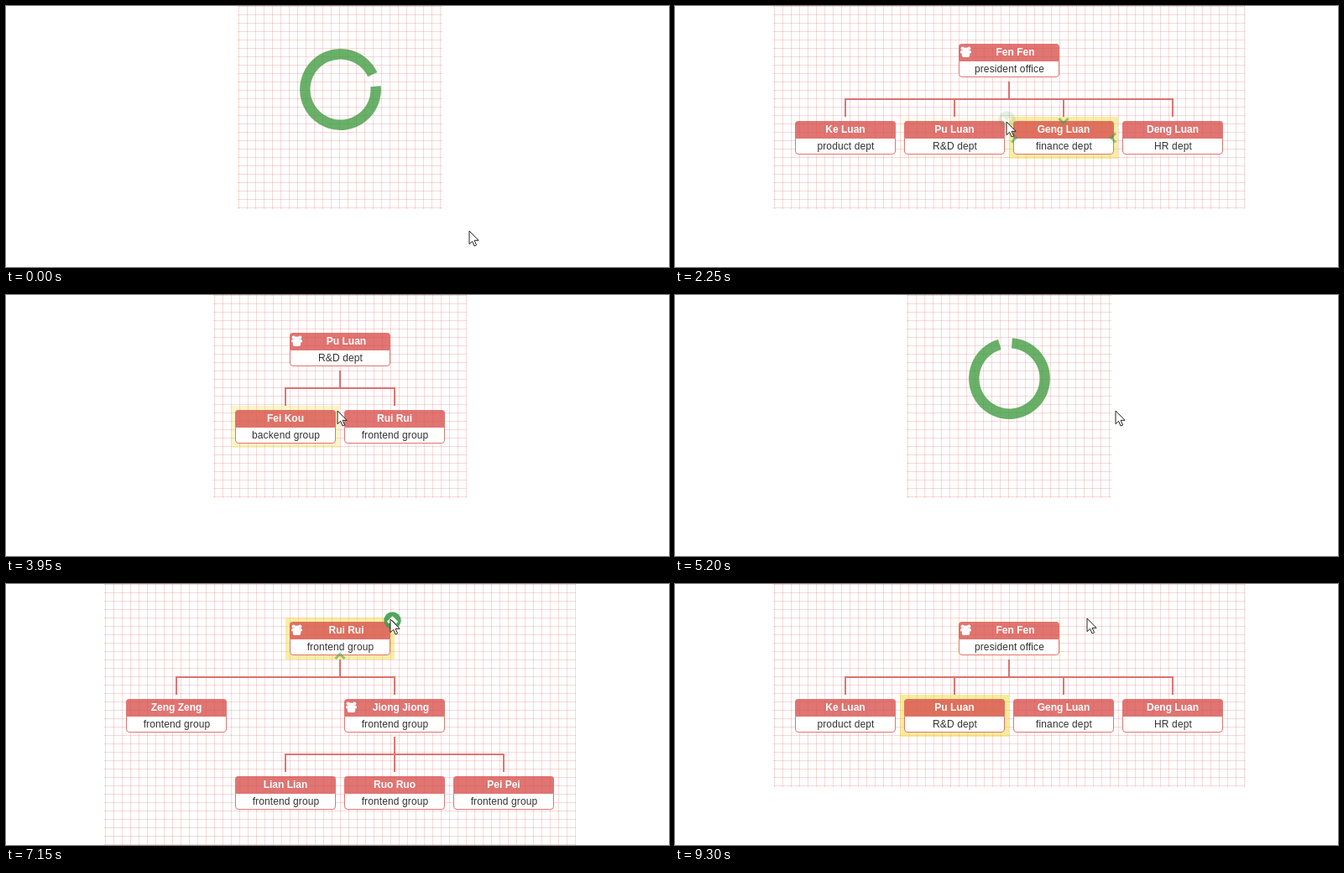
An HTML page for the animation above (9700 ms loop, 790x311 px).

```html
<!DOCTYPE html>
<html lang="en">
<head>
<meta charset="utf-8">
<title>Org chart drill down</title>
<style>
html, body { margin: 0; width: 100%; height: 100%; overflow: hidden; background: #fff; }
svg { display: block; width: 790px; height: 311px; }
text { font: 12px "Liberation Sans", Arial, sans-serif; text-anchor: middle; }
.name { font-weight: bold; fill: #fff; }
.dept { fill: #333; letter-spacing: .12px; }
.red { fill: rgba(217, 83, 79, .8); }
.grid { fill: rgba(200, 0, 0, .15); shape-rendering: crispEdges; }
.glow { fill: rgba(238, 217, 54, .5); }
.edge { fill: none; stroke: rgba(68, 157, 68, .55); stroke-width: 3; }
</style>
</head>
<body>
<svg id="stage" viewBox="0 0 790 311"></svg>
<script>
const LOOP = 9700, STEP = 50;
const stage = document.getElementById('stage');

function el(parent, tag, attrs, text) {
  const e = document.createElementNS('http://www.w3.org/2000/svg', tag);
  for (const k in attrs) e.setAttribute(k, attrs[k]);
  if (text) e.textContent = text;
  parent.appendChild(e);
  return e;
}

// 10px squared paper, lines one pixel wide
function grid(parent, x, w, h) {
  let cols = '', rows = '';
  for (let i = x + 1; i < x + w; i += 10) cols += `M${i} 0h1v${h}h-1z`;
  for (let j = 0; j < h; j += 10) rows += `M${x} ${j}h${w}v1h${-w}z`;
  el(parent, 'path', { class: 'grid', d: cols });
  el(parent, 'path', { class: 'grid', d: rows });
}

// connector from a parent cell to its children
function tree(parent, from, top, kids) {
  const a = kids[0], b = kids[kids.length - 1];
  let d = `M${from - 1} ${top}h2v20h-2zM${a - 1} ${top + 20}H${b + 1}v2H${a - 1}z`;
  for (const k of kids) d += `M${k - 1} ${top + 22}h2v20h-2z`;
  el(parent, 'path', { class: 'red', d });
}

function leaderIcon(parent, x, y) {
  const g = el(parent, 'g', { fill: '#fff', transform: `translate(${x} ${y})` });
  el(g, 'circle', { cx: 2.8, cy: 2.6, r: 2.2 });
  el(g, 'circle', { cx: 10.2, cy: 2.6, r: 2.2 });
  el(g, 'circle', { cx: 6.5, cy: 4.4, r: 2.9 });
  el(g, 'rect', { x: 0, y: 5, width: 13, height: 3.6, rx: 1.6 });
  el(g, 'rect', { x: 1.8, y: 7, width: 9.4, height: 6, rx: 2 });
}

// edges: t, b, l, r arrows shown on hover; drill: 1 down, -1 up
function node(layers, { x, y, name, dept, lead, edges = '', drill }) {
  const g = el(layers.base, 'g', { transform: `translate(${x - 65} ${y})` });
  const top = el(layers.over, 'g', { transform: `translate(${x - 65} ${y})` });
  const glow = el(g, 'rect', { class: 'glow', width: 130, height: 50 });
  el(g, 'path', { class: 'red', d: 'M5 25V9a4 4 0 0 1 4-4H121a4 4 0 0 1 4 4V25z' });
  el(g, 'path', { d: 'M5 25H125V41a4 4 0 0 1-4 4H9a4 4 0 0 1-4-4z', fill: '#fff' });
  el(g, 'path', {
    d: 'M5.5 25.5H124.5V41a3.5 3.5 0 0 1-3.5 3.5H9a3.5 3.5 0 0 1-3.5-3.5z',
    fill: 'none', stroke: 'rgba(217,83,79,.8)'
  });
  if (lead) leaderIcon(g, 7, 8);
  el(g, 'text', { class: 'name', x: lead ? 72.5 : 65, y: 19 }, name);
  el(g, 'text', { class: 'dept', x: 65.5, y: 39 }, dept);

  const arrows = el(top, 'g', { class: 'edge' });
  const shapes = {
    t: 'M59.5 2l5.5 5.5 5.5-5.5', b: 'M59.5 49l5.5-5.5 5.5 5.5',
    l: 'M3 19.5l5.5 5.5-5.5 5.5', r: 'M127 19.5l-5.5 5.5 5.5 5.5'
  };
  for (const e of edges) el(arrows, 'path', { d: shapes[e] });
  const icon = el(top, 'g', {});
  if (drill) {
    el(icon, 'circle', { cx: 127.5, cy: 3.5, r: 10.2, fill: '#3d9d4c' });
    el(icon, 'path', {
      d: `M122 ${3.5 - 2.5 * drill}l5.5 ${5.5 * drill} 5.5 ${-5.5 * drill}`,
      fill: 'none', stroke: '#fff', 'stroke-width': 3.2
    });
  }
  return { glow, arrows, icon };
}

function chart(x, w, h, links, list) {
  const root = el(stage, 'g', {});
  grid(root, x, w, h);
  const layers = { base: el(root, 'g', {}), over: el(root, 'g', {}) };
  for (const l of links) tree(layers.base, ...l);
  return { root, nodes: list.map(n => node(layers, n)) };
}

const COL = [203, 333, 463, 593], MID = 398, ROW = [40, 132, 224];
const front = 'frontend group';

const charts = {
  wait: chart(276, 244, 242, [], []),
  office: chart(117, 562, 242, [[MID, 90, COL]], [
    { x: MID, y: ROW[0], name: 'Fen Fen', dept: 'president office', lead: 1, edges: 'b' },
    { x: COL[0], y: ROW[1], name: 'Ke Luan', dept: 'product dept' },
    { x: COL[1], y: ROW[1], name: 'Pu Luan', dept: 'R&D dept', edges: 'tlr', drill: 1 },
    { x: COL[2], y: ROW[1], name: 'Geng Luan', dept: 'finance dept', edges: 'tlr' },
    { x: COL[3], y: ROW[1], name: 'Deng Luan', dept: 'HR dept' }
  ]),
  lab: chart(247, 302, 242, [[MID, 90, [COL[1], COL[2]]]], [
    { x: MID, y: ROW[0], name: 'Pu Luan', dept: 'R&D dept', lead: 1, edges: 'b', drill: -1 },
    { x: COL[1], y: ROW[1], name: 'Fei Kou', dept: 'backend group', edges: 'tlr' },
    { x: COL[2], y: ROW[1], name: 'Rui Rui', dept: front, edges: 'tlr', drill: 1 }
  ]),
  team: chart(117, 562, 311, [[MID, 90, [COL[0], COL[2]]], [COL[2], 182, COL.slice(1)]], [
    { x: MID, y: ROW[0], name: 'Rui Rui', dept: front, lead: 1, edges: 'b', drill: -1 },
    { x: COL[0], y: ROW[1], name: 'Zeng Zeng', dept: front },
    { x: COL[2], y: ROW[1], name: 'Jiong Jiong', dept: front, lead: 1, edges: 'tblr' },
    { x: COL[1], y: ROW[2], name: 'Lian Lian', dept: front },
    { x: COL[2], y: ROW[2], name: 'Ruo Ruo', dept: front },
    { x: COL[3], y: ROW[2], name: 'Pei Pei', dept: front }
  ])
};

// ring with a 20 degree gap centred on angle 0
const R = 42.2, gx = R * Math.cos(Math.PI / 18), gy = R * Math.sin(Math.PI / 18);
const ring = el(charts.wait.root, 'path', {
  d: `M${gx} ${gy}A${R} ${R} 0 1 1 ${gx} ${-gy}`,
  fill: 'none', stroke: 'rgba(68,157,68,.8)', 'stroke-width': 12.4
});

const pointer = el(stage, 'path', {
  d: 'M.5.5V16.2L4.1 12.8 6.6 18.5 9.1 17.4 6.6 11.8H11.6z',
  fill: '#fff', stroke: '#222', 'stroke-width': 1
});

// start, chart, start of its spin
const scenes = [
  [0, 'wait', -450], [550, 'office'], [2900, 'wait', 2900], [3850, 'lab'],
  [5200, 'wait', 5200], [6100, 'team'], [7600, 'lab'], [8500, 'office']
];

// chart, node, enter, leave
const hovers = [
  ['office', 3, 1600, 2220], ['office', 2, 2220, 2900],
  ['lab', 1, 3820, 4080], ['lab', 2, 4080, 5200],
  ['team', 2, 6480, 6540], ['team', 0, 6880, 7600],
  ['lab', 0, 7570, 8500], ['office', 0, 8470, 9000]
];

// chart, node, start of lasting highlight
const focus = [['lab', 2, 7600], ['office', 2, 8500]];

// time, x, y, eased
const path = [
  [1260, 552, 268], [1500, 512, 200], [1700, 474, 168], [2250, 395, 138],
  [4000, 395, 138], [4700, 525, 138, 1], [6450, 525, 138],
  [6930, 458, 42, 1], [8960, 458, 42], [9260, 491, 41, 1]
];

const clamp = v => Math.max(0, Math.min(1, v));
const smooth = v => v * v * (3 - 2 * v);
const fadeIn = v => 1 - (1 - clamp(v)) ** 2;

function pointerAt(t) {
  let a = path[0];
  for (const b of path) {
    if (t < b[0]) {
      let k = clamp((t - a[0]) / (b[0] - a[0] || 1));
      if (b[3]) k = smooth(k);
      return [a[1] + (b[1] - a[1]) * k, a[2] + (b[2] - a[2]) * k];
    }
    a = b;
  }
  return [a[1], a[2]];
}

function hoverAt(name, i, t) {
  let v = 0;
  for (const [c, n, on, off] of hovers) {
    if (c !== name || n !== i || t < on) continue;
    const peak = fadeIn((Math.min(t, off) - on) / 400);
    v = Math.max(v, t < off ? peak : peak * clamp(1 - (t - off) / 330));
  }
  return v;
}

function draw(t) {
  const [, name, spin] = scenes.filter(s => s[0] <= t).pop();
  for (const k in charts) charts[k].root.style.display = k === name ? '' : 'none';
  if (name === 'wait') {
    ring.setAttribute('transform', `translate(398.5 99.5) rotate(${-96 + (t - spin) * .18})`);
  }
  charts[name].nodes.forEach((n, i) => {
    const h = hoverAt(name, i, t);
    const kept = focus.some(f => f[0] === name && f[1] === i && t >= f[2]);
    n.glow.style.opacity = kept ? 1 : h;
    n.icon.style.opacity = h;
    n.arrows.style.display = h > .75 ? '' : 'none';
  });
  const [x, y] = pointerAt(t).map(Math.round);
  pointer.setAttribute('transform', `translate(${x - .5} ${y - .5})`);
}

const begin = performance.now();
function tick() {
  const t = (performance.now() - begin) % LOOP;
  draw(Math.floor(t / STEP) * STEP);
  requestAnimationFrame(tick);
}
tick();
</script>
</body>
</html>
```
